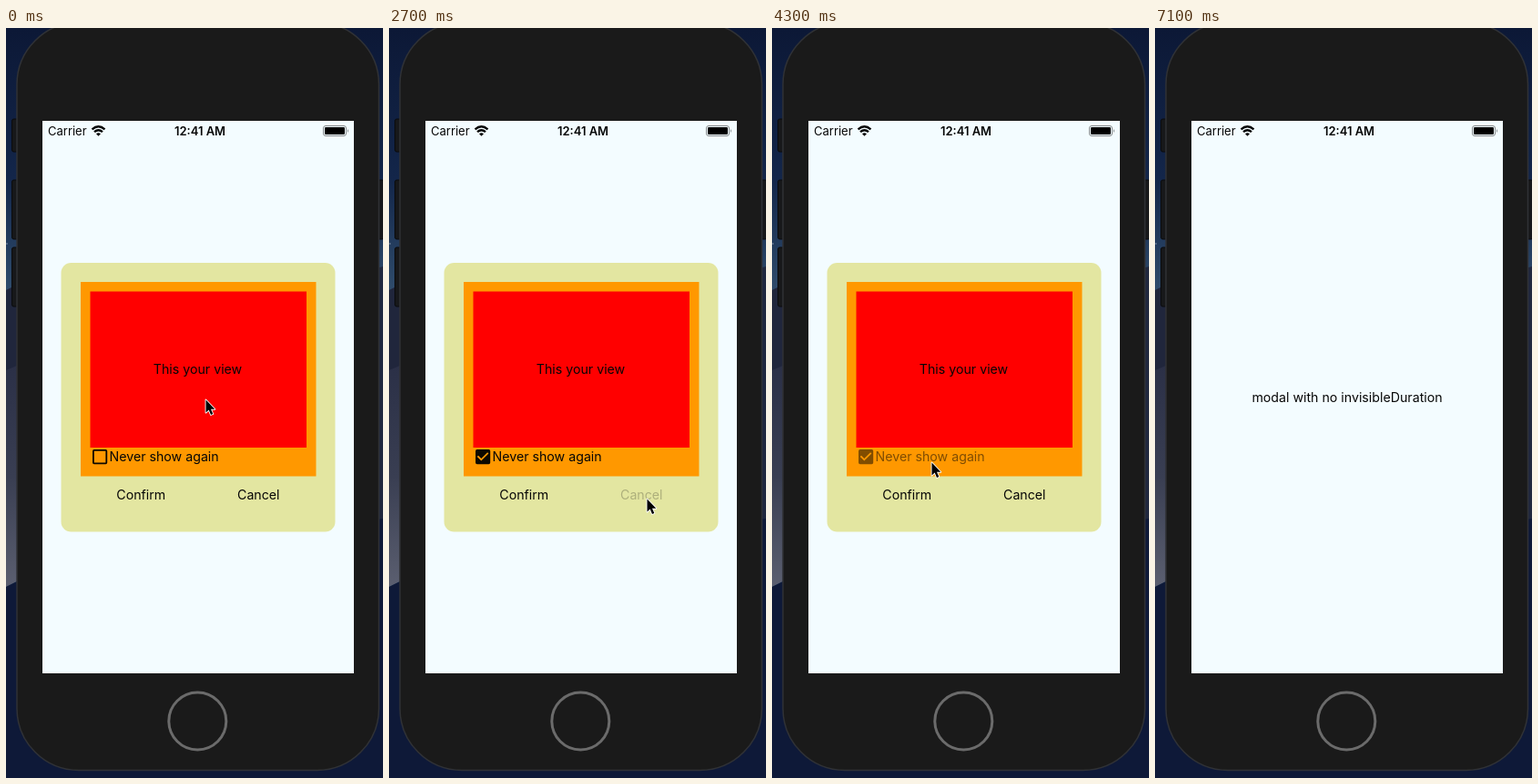
An HTML page that plays this animation: 414x824 px, repeating every 8000 ms.

```html
<!DOCTYPE html>
<html lang="en">
<head>
<meta charset="utf-8">
<title>Modal demo</title>
<style>
html, body { margin: 0; width: 100%; height: 100%; overflow: hidden; background: #0d1835; }
svg { display: block; width: 100vw; height: 100vh; }
text { font: 14.2px Inter, "Open Sans", sans-serif; fill: #060606; }
.mid { text-anchor: middle; }
.status { font-size: 13px; }
.clock { font-weight: 600; }

/* Paused animations, positioned by the 10 fps clock below */
.anim {
  animation: 8s linear infinite paused;
  animation-delay: calc(var(--t, 0) * -1ms);
}
#modal { animation-name: slide; }
#row { animation-name: rowPress; }
#on { animation-name: checked; }
#off { animation-name: unchecked; }
#cancel { animation-name: cancelPress; }
#confirm { animation-name: confirmPress; }
#cursor { animation-name: move; }
#arrow { animation-name: hide; }

@keyframes slide {
  0% { transform: translateY(0); }
  35.625% { transform: translateY(0); animation-timing-function: ease-in; }
  37.5% { transform: translateY(148px); animation-timing-function: ease-out; }
  40% { transform: translateY(452px); }
  42.5% { transform: translateY(452px); }
  45% { transform: translateY(107px); animation-timing-function: ease-out; }
  47.5% { transform: translateY(0); }
  63.125% { transform: translateY(0); animation-timing-function: ease-in; }
  65% { transform: translateY(148px); animation-timing-function: ease-out; }
  67.5%, 100% { transform: translateY(452px); }
}
@keyframes rowPress {
  0%, 13.75% { opacity: 1; }
  15% { opacity: .2; }
  16.25% { opacity: .52; }
  17.5%, 51.25% { opacity: 1; }
  52.5% { opacity: .2; }
  53.75% { opacity: .52; }
  55%, 100% { opacity: 1; }
}
@keyframes checked {
  0%, 16.2% { opacity: 0; }
  16.21%, 41.2% { opacity: 1; }
  41.21%, 53.7% { opacity: 0; }
  53.71%, 100% { opacity: 1; }
}
@keyframes unchecked {
  0%, 16.2% { opacity: 1; }
  16.21%, 41.2% { opacity: 0; }
  41.21%, 53.7% { opacity: 1; }
  53.71%, 100% { opacity: 0; }
}
@keyframes cancelPress {
  0%, 32.5% { opacity: 1; }
  33.75%, 35% { opacity: .24; }
  37.5%, 100% { opacity: 1; }
}
@keyframes confirmPress {
  0%, 60% { opacity: 1; }
  61.25%, 62.5% { opacity: .24; }
  65%, 100% { opacity: 1; }
}
@keyframes move {
  0% { transform: translate(219px, 408px); animation-timing-function: ease-in-out; }
  11.25%, 22.5% { transform: translate(156px, 476px); animation-timing-function: ease-in-out; }
  32.5%, 35% { transform: translate(283px, 517px); animation-timing-function: ease-in-out; }
  41.25%, 45% { transform: translate(200px, 414px); animation-timing-function: ease-in-out; }
  50%, 55% { transform: translate(175px, 477px); animation-timing-function: ease-in-out; }
  60%, 63.75% { transform: translate(152px, 517px); animation-timing-function: ease-in-out; }
  68.75% { transform: translate(198px, 449px); animation-timing-function: ease-out; }
  76.25%, 100% { transform: translate(212px, 411px); }
}
@keyframes hide {
  0%, 87.4% { opacity: 1; }
  87.41%, 100% { opacity: 0; }
}
</style>
</head>
<body>
<svg viewBox="0 0 414 824" preserveAspectRatio="none">
  <defs>
    <linearGradient id="sky" x2="0" y2="1">
      <stop offset="0" stop-color="#0c1836"/>
      <stop offset=".2" stop-color="#13264a"/>
      <stop offset=".35" stop-color="#2f4c6c"/>
    </linearGradient>
    <linearGradient id="dune" x2="0" y2="1">
      <stop offset="0" stop-color="#2b3047"/>
      <stop offset=".5" stop-color="#393e52"/>
      <stop offset="1" stop-color="#5b5f70"/>
    </linearGradient>
    <clipPath id="screen"><rect x="40" y="102" width="342" height="607"/></clipPath>
  </defs>

  <!-- wallpaper -->
  <rect width="414" height="824" fill="url(#sky)"/>
  <path d="M0 288L12 282V376H0z" fill="#20263c"/>
  <path d="M0 376L12 371V608L0 614z" fill="url(#dune)"/>
  <path d="M400 266L414 262V540H400z" fill="#20283f"/>
  <path d="M0 614L12 608L400 541L414 539V824H0z" fill="#0e1938"/>
  <circle cx="1" cy="237" r=".8" fill="#8fa0b8"/>

  <!-- phone -->
  <g fill="#17181a" stroke="#0a0b0d">
    <rect x="6.500" y="100" width="10" height="36" rx="2"/>
    <rect x="6.500" y="167" width="10" height="65" rx="2"/>
    <rect x="6.500" y="241" width="10" height="65" rx="2"/>
    <rect x="404" y="167" width="11" height="65" rx="2"/>
  </g>
  <rect x="12" y="-6" width="397.500" height="821.500" rx="68" fill="#1a1a1a" stroke="#303236" stroke-width="1.500"/>
  <circle cx="210.300" cy="761.500" r="31.500" fill="none" stroke="#6b6b6b" stroke-width="3"/>
  <rect x="40" y="102" width="342" height="607" fill="#f3fcff"/>

  <!-- status bar -->
  <text class="status" x="46" y="118">Carrier</text>
  <g fill="none" stroke="#060606" stroke-width="2.300">
    <path d="M94.500 111.400Q101.500 105.200 108.500 111.400"/>
    <path d="M97 114.200Q101.500 110.300 106 114.200"/>
  </g>
  <path d="M99 116.200Q101.500 114.200 104 116.200L101.500 118.800z" fill="#060606"/>
  <text class="status clock mid" x="213" y="118">12:41 AM</text>
  <rect x="348.500" y="107.500" width="25" height="11" rx="2.500" fill="none" stroke="#85898b"/>
  <rect x="350" y="109" width="22" height="8" rx="1.200" fill="#000"/>
  <path d="M375 111Q377 113 375 115z" fill="#85898b"/>

  <g clip-path="url(#screen)">
    <text class="mid" x="211" y="411">modal with no invisibleDuration</text>
    <g id="modal" class="anim">
      <rect x="60.500" y="258" width="301" height="295.500" rx="11" fill="#e3e6a1"/>
      <rect x="82" y="279" width="258.500" height="213.500" fill="#ff9800"/>
      <rect x="92.500" y="289.500" width="237.500" height="171.500" fill="#f00"/>
      <text class="mid" x="210.500" y="380">This your view</text>
      <g id="row" class="anim">
        <g transform="translate(92.300 460.300) scale(.9)" fill="#0c0900">
          <path id="off" class="anim" d="M19 5v14H5V5zm0-2H5a2 2 0 0 0-2 2v14a2 2 0 0 0 2 2h14a2 2 0 0 0 2-2V5a2 2 0 0 0-2-2z"/>
          <path id="on" class="anim" fill-rule="evenodd" d="M19 3H5a2 2 0 0 0-2 2v14a2 2 0 0 0 2 2h14a2 2 0 0 0 2-2V5a2 2 0 0 0-2-2zm-9 14l-5-5 1.410-1.410L10 14.170l7.590-7.590L19 8z"/>
        </g>
        <text x="113.500" y="476">Never show again</text>
      </g>
      <text id="confirm" class="anim mid" x="148.300" y="518">Confirm</text>
      <text id="cancel" class="anim mid" x="277.300" y="518">Cancel</text>
    </g>
  </g>

  <g id="cursor" class="anim">
    <path id="arrow" class="anim" d="M.5 .5V14.500L3.700 11.600L6 17L8.300 16L6 10.800H10.300z" fill="#000" stroke="#fff" stroke-width="1.800" paint-order="stroke" stroke-linejoin="round"/>
  </g>
</svg>
<script>
const LOOP = 8000, STEP = 100;
const root = document.documentElement;

function tick() {
  const t = performance.now() % LOOP;
  root.style.setProperty('--t', Math.floor(t / STEP) * STEP);
  requestAnimationFrame(tick);
}
tick();
</script>
</body>
</html>
```
